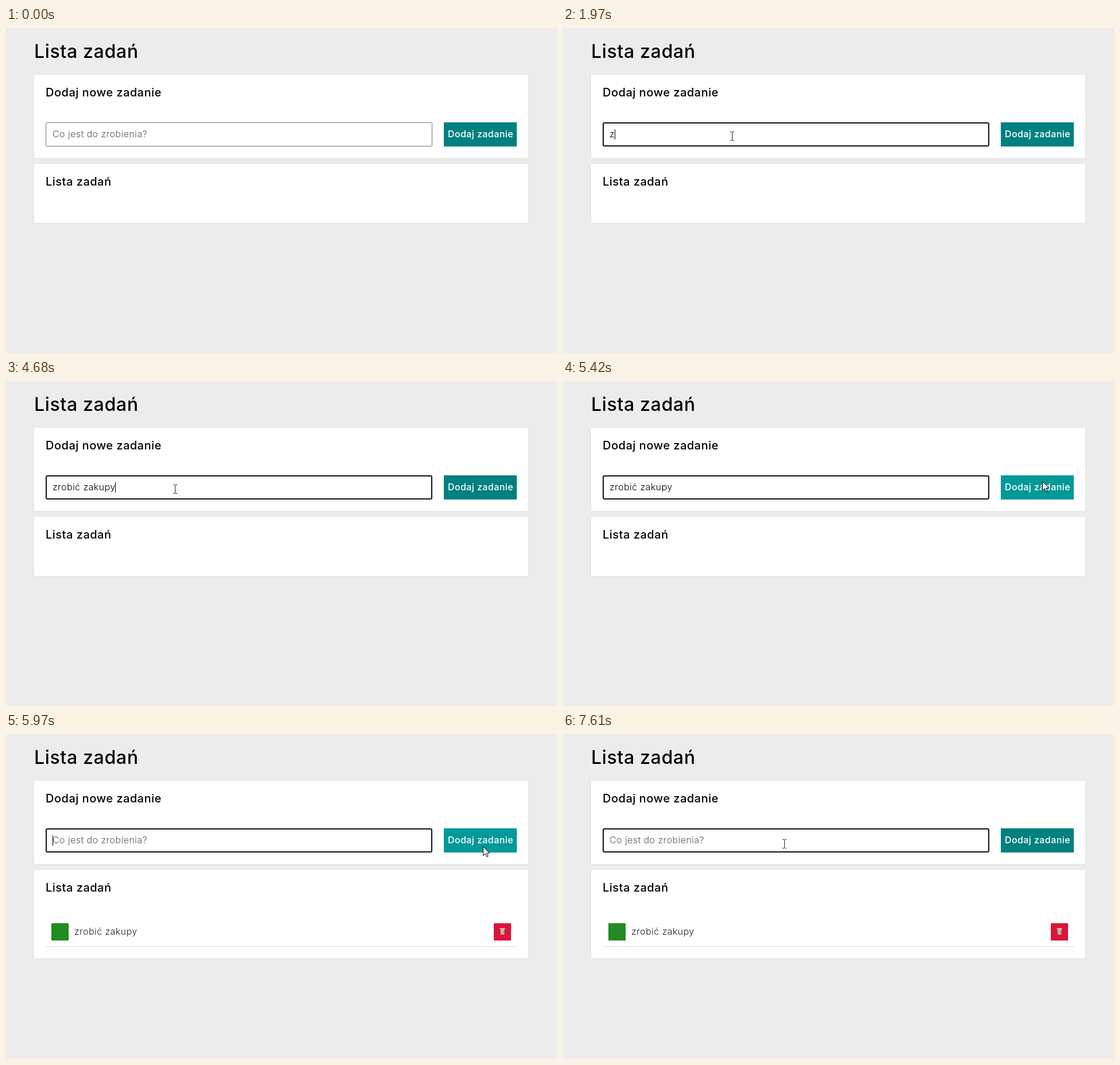
Recreate the animation shown at these times as an HTML page. Size 959 by 565 pixels, loop 8 s.

```html
<!DOCTYPE html>
<html lang="pl">
<head>
<meta charset="utf-8">
<title>Lista zadań</title>
<style>
html, body { margin: 0; width: 100%; height: 100%; overflow: hidden; background: #ececec; }
svg { display: block; }
text { font: 300 16px Montserrat, Inter, sans-serif; letter-spacing: .42px; white-space: pre; }
.title { font-size: 32px; font-weight: 450; letter-spacing: .65px; }
.head { font-size: 20px; font-weight: 480; letter-spacing: .5px; }
.label { font-weight: 450; fill: #fff; text-anchor: middle; }
.card { fill: #fff; filter: drop-shadow(0 0 1.5px #d8d8d8); }
</style>
</head>
<body>
<svg width="959" height="565" viewBox="0 0 959 565">
  <rect width="959" height="565" fill="#ececec"/>
  <text class="title" x="49" y="51.5">Lista zadań</text>

  <rect class="card" x="49" y="81" width="860" height="145"/>
  <text class="head" x="69" y="119">Dodaj nowe zadanie</text>
  <rect id="field" fill="#fff"/>
  <text id="entry" x="81" y="190"></text>
  <rect id="caret" y="176" width="1" height="18"/>
  <rect id="button" x="762" y="164" width="127" height="42"/>
  <text class="label" x="826" y="190">Dodaj zadanie</text>

  <rect class="card" id="list" x="49" y="236" width="860"/>
  <text class="head" x="69" y="274">Lista zadań</text>
  <g id="item">
    <rect x="79" y="329" width="30" height="30" fill="#228b22"/>
    <text x="119" y="349" fill="#222">zrobić zakupy</text>
    <rect x="849" y="329" width="30" height="30" fill="#dc143c"/>
    <path d="M860.5 339.5h7l-.4 9.5h-6.2z" fill="#d8d2bd" stroke="#77684f" stroke-width=".8"/>
    <path d="M862.5 341v7M864 341v7M865.5 341v7" stroke="#8a7f68" stroke-width=".6"/>
    <path d="M859.5 338.5h9" stroke="#f1ead6" stroke-width="1.5"/>
    <rect x="69" y="369" width="820" height="1" fill="#ddd"/>
  </g>

  <g id="pointer">
    <circle id="halo" cx="-2" cy="-1" r="12" fill="#ffff80"/>
    <path id="beam" d="M-3 -7.5h3M1 -7.5h3M.5 -7V7M-3 7.5h3M1 7.5h3" fill="none" stroke="#222"/>
    <path id="arrow" d="M.5 .5V16.5L4.2 13L6.8 18.5L9.2 17.4L6.7 12.2H11.7Z" fill="#fff" stroke="#000"/>
  </g>
</svg>
<script>
const $ = id => document.getElementById(id);
const set = (id, attrs) => {
  for (const name in attrs) $(id).setAttribute(name, attrs[name]);
};
const show = (id, on) => set(id, { visibility: on ? 'visible' : 'hidden' });

const LOOP = 8000, FOCUS = 1020, ADD = 5970, PRESS = 130;

// Typing comes in bursts with an even rhythm inside each
const KEY_GAP = 145;
const bursts = [[1970, 'zr'], [2440, 'obi'], [3170, 'ć zak'], [4290, 'upy']];
const keys = bursts.flatMap(([start, text]) =>
  [...text].map((char, i) => ({ time: start + i * KEY_GAP, char })));

// Each move eases out along a curve from where the previous one stopped
const entryPoint = [462, 560];
const moves = [
  { start: 260, end: 900, via: [335, 360], to: [294, 188] },
  { start: 5150, end: 5420, via: [600, 174], to: [834, 174] },
  { start: 5480, end: 5840, via: [834, 186], to: [831, 195] },
  { start: 5970, end: 6870, via: [700, 214], to: [380, 199] },
  { start: 6870, end: 7610, via: [388, 195], to: [385, 191] }
];

function pointerAt(t) {
  let pos = entryPoint;
  for (const { start, end, via, to } of moves) {
    if (t < start) break;
    const left = (1 - Math.min(1, (t - start) / (end - start))) ** 2, k = 1 - left;
    pos = pos.map((from, i) =>
      Math.round(left * left * from + 2 * left * k * via[i] + k * k * to[i]));
  }
  return pos;
}

function drawField(t) {
  const focused = t >= FOCUS, added = t >= ADD;
  const w = focused ? 2 : 1;
  set('field', {
    x: 69 + w / 2, y: 164 + w / 2, width: 673 - w, height: 42 - w,
    rx: w, stroke: focused ? '#101010' : '#767676', 'stroke-width': w
  });

  const pressed = keys.filter(key => key.time <= t);
  const typed = added ? '' : pressed.map(key => key.char).join('');
  const entry = $('entry');
  entry.textContent = typed || 'Co jest do zrobienia?';
  set('entry', { fill: typed ? '#000' : '#5a5a5a' });

  // The blink restarts on focus, each key press and submit
  const since = Math.max(FOCUS, ...pressed.map(key => key.time), added ? ADD : 0);
  show('caret', focused && (t - since) % 1040 < 525);
  set('caret', { x: Math.round(81 + (typed ? entry.getComputedTextLength() : 0)) });
}

function drawPointer(t) {
  const [x, y] = pointerAt(t);
  const visible = t >= moves[0].start;
  const inside = (left, right) => x >= left && x < right && y >= 164 && y < 206;
  const overField = inside(69, 742);
  set('button', { fill: inside(762, 889) ? '#099' : '#008080' });
  set('pointer', { transform: `translate(${x} ${y})` });
  show('beam', visible && overField);
  show('arrow', visible && !overField);
  show('halo', (t >= FOCUS && t < FOCUS + 70) || (t >= ADD - PRESS && t < ADD));
}

function draw(now) {
  const t = now % LOOP;
  drawField(t);
  drawPointer(t);
  show('item', t >= ADD);
  set('list', { height: t >= ADD ? 154 : 103 });
  requestAnimationFrame(draw);
}
draw(0);
</script>
</body>
</html>
```
